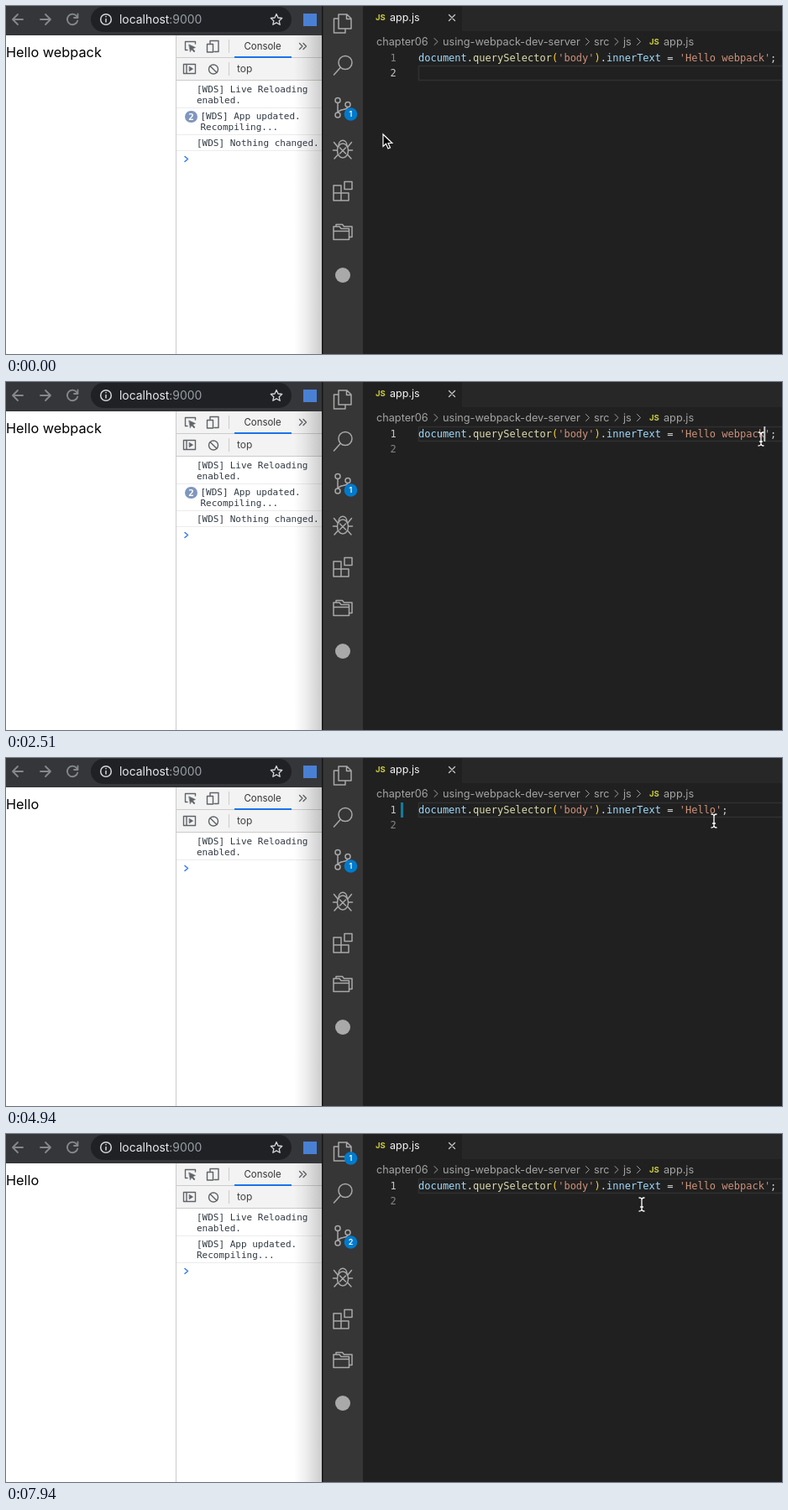
An HTML page for the animation above (8 s loop, 924x415 px).

```html
<!DOCTYPE html>
<html lang="en">
<head>
<meta charset="utf-8">
<style>
html, body { margin: 0; width: 100%; height: 100%; overflow: hidden; background: #202020; }
svg { display: block; width: 924px; height: 415px; }
text { font-family: Inter, Roboto, sans-serif; white-space: pre; }
.mono { font-family: "DejaVu Sans Mono", monospace; font-size: 12px; }
.log text { font-family: "DejaVu Sans Mono", monospace; font-size: 11px; fill: #303942; }
.log path { stroke: #ececec; }
.line { fill: none; stroke-linecap: round; stroke-linejoin: round; }
.js { font-size: 9.5px; font-weight: 700; fill: #cbcb41; }
.badge circle { fill: #007acc; }
.badge text { fill: #fff; font-size: 9px; font-weight: 600; text-anchor: middle; }
</style>
</head>
<body>
<svg viewBox="0 0 924 415">
  <defs>
    <linearGradient id="shade">
      <stop offset="0" stop-opacity="0"/>
      <stop offset=".4" stop-opacity=".06"/>
      <stop offset="1" stop-opacity=".2"/>
    </linearGradient>
  </defs>

  <!-- Browser -->
  <rect width="376" height="415" fill="#fff"/>
  <rect width="376" height="35" fill="#35363a"/>
  <rect x="101" y="1" width="239" height="30" rx="15" fill="#202124"/>
  <g class="line" stroke="#85888c" stroke-width="1.8">
    <path d="M20 16H8M14 10L8 16L14 22M41 16H53M47 10L53 16L47 22"/>
    <path d="M84.5 12.5A6.3 6.3 0 1 0 85.3 17.5M85.5 9.5V14H81"/>
  </g>
  <g class="line" stroke="#d5d7da" stroke-width="1.5">
    <circle cx="119" cy="16" r="6.3"/>
    <path d="M119 15.5V19M119 12.6V12.8"/>
    <path stroke-width="1.3" d="M322 9.5L324 14L328.700 14.500L325.200 17.700L326.200 22.300L322 19.900L317.800 22.300L318.800 17.700L315.300 14.500L320 14Z"/>
  </g>
  <text x="135" y="21" font-size="13.9" fill="#e8eaed">localhost<tspan fill="#9aa0a6">:9000</tspan></text>
  <rect x="354" y="9" width="16" height="15" fill="#4a80d4"/>
  <text id="page" x="0" y="61" font-size="16.3" fill="#000"></text>

  <!-- Developer tools -->
  <rect x="203" y="35" width="173" height="54" fill="#f3f3f3"/>
  <path d="M202.500 35V415M203 61.500H376M203 88.500H376M265.500 40V56M265.500 67V83" stroke="#cbcbcb"/>
  <rect x="272" y="60" width="68" height="2" fill="#1a73e8"/>
  <g class="line" stroke="#5f6368" stroke-width="1.4">
    <path d="M216 52.500H213.500V42.500H225.500V45"/>
    <path d="M218 46L225.500 49.500L222.300 50.700L225 54L224 55L221 51.800L219.500 54.500Z" fill="#5f6368" stroke-width=".6"/>
    <path d="M243 45V41.500H253V54.500H248M239.500 45.500H246.500V55H239.500Z"/>
    <path d="M349.500 44.500L353 48L349.500 51.500M354 44.500L357.500 48L354 51.500"/>
    <path d="M211.500 69.500H225.500V80.500H211.500ZM215 69.500V80.500"/>
    <path d="M218.500 72.500L222.500 75L218.500 77.500Z" fill="#5f6368" stroke-width=".8"/>
    <circle cx="247" cy="75.500" r="5.500"/>
    <path d="M243.200 71.700L250.800 79.300"/>
  </g>
  <text x="283.500" y="52" font-size="11.4" fill="#333">Console</text>
  <text x="275" y="79" font-size="12" fill="#444">top</text>
  <g id="console" class="log"></g>
  <path id="prompt" class="line" d="M213 -3L216.500 0L213 3" stroke="#367cf1" stroke-width="1.6"/>
  <rect x="343" y="35" width="33" height="380" fill="url(#shade)"/>

  <!-- Editor -->
  <rect x="376" width="548" height="415" fill="#202020"/>
  <rect x="377" width="48" height="415" fill="#363636"/>
  <rect x="376" width="1.500" height="415" fill="#161616"/>
  <rect x="543" width="381" height="30" fill="#272727"/>
  <g class="line" stroke="#a9a9a9" stroke-width="1.5">
    <path d="M396 10H406L411 15V27H396ZM405.500 10V15.500H411M395.500 15H390.500V32H404V27.500"/>
    <circle cx="404" cy="67.500" r="8"/><path d="M398.300 73.300L390.500 82"/>
    <circle cx="395" cy="112.500" r="3"/><circle cx="395" cy="130" r="3"/><circle cx="407" cy="117.500" r="3"/>
    <path d="M395 115.500V127M407 120.500C406 125 397 122 395.500 127"/>
    <ellipse cx="401" cy="172.500" rx="6.500" ry="8.500"/>
    <path d="M396 167C396 158 406 158 406 167M394.500 172H389.500M407.500 172H412.500M395 168L390.500 162.500M407 168L411.500 162.500M395.500 177L391 182M406.500 177L411 182M397.500 169L404.500 176M404.500 169L397.500 176"/>
    <path d="M390 214H399V223H408V232H390ZM390 223H399V232M403 209.500H412V218.500H403Z"/>
    <path d="M390 263H397L399 265.500H408.500V278.500H390ZM390 268.500H408.500M393 263V260.500H400.500L402.500 263H412V275.500H408.500"/>
  </g>
  <circle cx="401" cy="321" r="9" fill="#a9a9a9"/>
  <g id="files" class="badge"><circle cx="410.500" cy="29" r="7.800"/><text x="410.500" y="32.300">1</text></g>
  <g class="badge">
    <circle cx="410.500" cy="129" r="7.800"/>
    <text id="changes" x="410.500" y="132.300"></text>
    <g id="clock" class="line" stroke="#fff" stroke-width="1.2">
      <circle cx="410.500" cy="129" r="5"/><path d="M410.500 125.800V129.300L412.800 131"/>
    </g>
  </g>

  <text class="js" x="440" y="17">JS</text>
  <text x="457" y="18" font-size="12.500" fill="#f2f2f2">app.js</text>
  <path id="close" class="line" d="M527.500 10.500L534.500 17.500M534.500 10.500L527.500 17.500" stroke="#c8c8c8" stroke-width="1.300"/>
  <circle id="dirty" cx="531" cy="14" r="4" fill="#d0d0d0"/>
  <g font-size="12.700" fill="#a3a3a3">
    <text x="441" y="47">chapter06</text>
    <text x="520" y="47">using-webpack-dev-server</text>
    <text x="700" y="47">src</text>
    <text x="735" y="47">js</text>
    <text x="783" y="47">app.js</text>
  </g>
  <text class="js" x="766" y="46">JS</text>
  <path class="line" d="M510 38.500L514 42.500L510 46.500M690.500 38.500L694.500 42.500L690.500 46.500M725 38.500L729 42.500L725 46.500M751.500 38.500L755.500 42.500L751.500 46.500" stroke="#a3a3a3"/>

  <rect id="row" x="491.500" width="440" height="17" fill="none" stroke="#303030" stroke-width="1.500"/>
  <text id="num1" class="mono" x="457.500" y="66">1</text>
  <text id="num2" class="mono" x="457.500" y="84">2</text>
  <rect id="gutter" x="470" y="53" width="3" height="18" fill="#0c7d9d"/>
  <text class="mono" x="491" y="66" fill="#d4d4d4"><tspan fill="#9cdcfe">document</tspan>.<tspan fill="#dcdcaa">querySelector</tspan><tspan fill="#ffd02e">(</tspan><tspan fill="#ce9178">'body'</tspan><tspan fill="#ffd02e">)</tspan>.<tspan fill="#9cdcfe">innerText</tspan> = <tspan id="string" fill="#ce9178"></tspan>;</text>
  <rect id="caret" width="2" height="18" fill="#c8c8c8"/>

  <path id="arrow" d="M0 0V14.500L3.500 11.300L6 17L8.500 16L6 10.500H10.800Z" fill="#000" stroke="#fff" stroke-width="1.200"/>
  <path id="beam" class="line" d="M-3 -8Q0 -8 0 -5.500Q0 -8 3 -8M0 -5.500V5.500M-3 8Q0 8 0 5.500Q0 8 3 8M-1.500 3H1.500" stroke="#fff" stroke-width="1.300"/>
</svg>
<script>
const LOOP = 8000, CHAR = 7.224, FULL = 'Hello webpack';
const $ = id => document.getElementById(id);
const show = (id, on) => $(id).setAttribute('display', on ? 'inline' : 'none');
const put = (id, x, y) => $(id).setAttribute('transform', `translate(${x} ${y})`);
const label = (id, s) => { if ($(id).textContent !== s) $(id).textContent = s; };
const within = (t, spans) => spans.some(([a, b]) => t >= a && t < b);

const deletions = [3040, 3220, 3340, 3460, 3560, 3750, 3930, 4170];
const caretOn = [[280, 760], [1230, 1690], [2160, 2330], [2510, 2810], [3040, 4640],
                 [5180, 5680], [6150, 6650], [7100, 7880]];
// Pointer path: time, x, y
const path = [
  [60, 449, 153], [280, 441, 168], [760, 441, 168], [1000, 520, 142], [1400, 897, 69],
  [1930, 897, 69], [2330, 899, 68], [4470, 899, 68], [4800, 843, 75], [5180, 843, 75],
  [5420, 500, 36], [5620, 160, 30], [5790, 20, 70], [5960, 100, 103], [6030, 100, 103],
  [6200, 24, 74], [6350, 70, 24], [6530, 320, 30], [6820, 752, 83], [6900, 757, 84]
];

function pointer(t) {
  const i = path.findIndex(p => p[0] > t);
  if (i === 0) return path[0].slice(1);
  if (i < 0) return path.at(-1).slice(1);
  const [a, x, y] = path[i - 1], [b, u, v] = path[i];
  const k = (t - a) / (b - a);
  return [x + (u - x) * k, y + (v - y) * k];
}

const live = { lines: ['[WDS] Live Reloading', 'enabled.'] };
const updated = { lines: ['[WDS] App updated.', 'Recompiling...'] };
const nothing = { lines: ['[WDS] Nothing changed.'] };

function messages(t) {
  if (t < 4640) return [live, { ...updated, count: 2 }, nothing];
  if (t < 4820) return [live, { ...updated, count: 2 }, nothing, updated];
  return t < 7930 ? [live] : [live, updated];
}

let shownLog = '';
function drawLog(list) {
  const key = JSON.stringify(list);
  if (key === shownLog) return;
  shownLog = key;
  let y = 89, out = '';
  for (const { lines, count } of list) {
    const x = count ? 231.500 : 227;
    lines.forEach((s, i) => out += `<text x="${x}" y="${y + 14 + 13 * i}">${s}</text>`);
    if (count) out += `<rect x="213" y="${y + 35 - 32 + 1}" width="15" height="14" rx="7" fill="#8097bd"/>
      <text x="217.200" y="${y + 15}" style="fill:#fff;font-weight:700">${count}</text>`;
    y += 6 + 13 * lines.length;
    out += `<path d="M203 ${y + .5}H376"/>`;
  }
  $('console').innerHTML = out;
  put('prompt', 0, y + 10.500);
}

function draw(t) {
  const restored = t >= 7400;
  const left = restored ? 13 : 13 - deletions.filter(d => t >= d).length;
  label('string', `'${FULL.slice(0, left)}'`);
  label('page', t < 4820 ? FULL : 'Hello');
  drawLog(messages(t));

  const unsaved = within(t, [[3040, 4470], [7400, 7880]]);
  show('dirty', unsaved);
  show('close', !unsaved);
  show('files', within(t, [[3220, 4700], [7640, LOOP]]));
  show('gutter', within(t, [[3930, 7640]]));
  const busy = within(t, [[5700, 6400]]);
  show('clock', busy);
  label('changes', busy ? '' : t < 5700 ? '1' : '2');

  const first = t >= 2510;
  $('num1').setAttribute('fill', first ? '#c6c6c6' : '#858585');
  $('num2').setAttribute('fill', first ? '#858585' : '#c6c6c6');
  put('row', 0, t < 2330 ? 71.500 : 53.500);
  show('caret', within(t, caretOn));
  put('caret', first ? 490.500 + (44 + left) * CHAR : 491, first ? 53 : 71);

  const [x, y] = pointer(t);
  const visible = !within(t, [[1440, 1930]]);
  const overText = x > 485 && y > 52;
  show('arrow', visible && !overText);
  show('beam', visible && overText);
  put('arrow', x, y);
  put('beam', x, y);
}

function frame() {
  draw(performance.now() % LOOP);
  requestAnimationFrame(frame);
}
frame();
</script>
</body>
</html>
```
